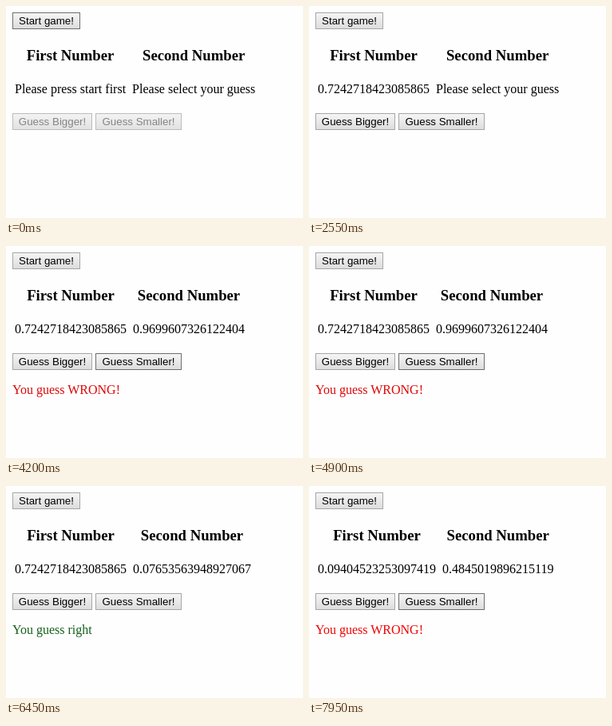
Animation of 372 by 265 pixels, one loop 8 s. Source, as an HTML page:

```html
<!DOCTYPE html>
<html lang="en">
<head>
<meta charset="utf-8">
<title>Number guessing game</title>
<style>
html, body { margin: 0; width: 100%; height: 100%; overflow: hidden; background: #fefefe; }
#stage { position: relative; width: 372px; height: 265px; overflow: hidden;
  font: 16px/18px "Liberation Serif", "Times New Roman", serif; color: #000; }
#stage > * { position: absolute; white-space: nowrap; }
.head { top: 51px; font-size: 18.72px; line-height: 21px; font-weight: bold; transform: translateX(-50%); }
.cell { top: 95px; }
.btn { box-sizing: border-box; height: 21px; padding: 2px 0; border: 1px solid #a6a6a6; text-align: center;
  font: 13.333px/15px "Liberation Sans", Arial, sans-serif;
  background: linear-gradient(#f5f5f5, #dddddd); }
.btn.hover { border-color: #6e6e6e; }
.btn.off { color: #848484; border-color: #bcbcbc; background: linear-gradient(#f3f3f3, #e2e2e2); }
#start { left: 8px; top: 8px; width: 85px; }
#bigger { left: 8px; top: 134px; width: 100px; }
#smaller { left: 112px; top: 134px; width: 108px; }
#msg { left: 8px; top: 171px; }
</style>
</head>
<body>
<div id="stage">
  <div class="btn" id="start">Start game!</div>
  <div class="head" id="head1">First Number</div>
  <div class="head" id="head2">Second Number</div>
  <div class="cell" id="first"></div>
  <div class="cell" id="second"></div>
  <div class="btn" id="bigger">Guess Bigger!</div>
  <div class="btn" id="smaller">Guess Smaller!</div>
  <div id="msg"></div>
</div>
<script>
const LOOP = 8000, LEFT = 11, GAP = 8;
const el = id => document.getElementById(id);
const ASK = "Please select your guess";
const WRONG = "You guess WRONG!", RIGHT = "You guess right";

// Each entry changes only the properties it names.
const events = [
  [0, { first: "Please press start first", second: ASK, msg: "", color: "#000", hover: "start", on: false }],
  [2150, { first: "0.7242718423085865", on: true }],
  [2450, { hover: "" }],
  [2750, { hover: "bigger" }],
  [2900, { second: "0.3604360085295315", msg: WRONG, color: "#dc0808" }],
  [3550, { hover: "" }],
  [3700, { hover: "smaller" }],
  [3900, { second: "0.9699607326122404" }],
  [5100, { second: "0.07653563948927067", msg: RIGHT, color: "#14601a" }],
  [5400, { hover: "bigger" }],
  [5900, { hover: "" }],
  [6500, { first: "0.09404523253097419", second: ASK, msg: "", hover: "start" }],
  [6800, { hover: "" }],
  [7000, { hover: "smaller" }],
  [7150, { second: "0.4845019896215119", msg: WRONG, color: "#f00404" }]
];

function stateAt(t) {
  const s = {};
  for (const [at, change] of events) if (at <= t) Object.assign(s, change);
  return s;
}

function placeColumn(cell, head, text, x) {
  cell.textContent = text;
  cell.style.left = x + "px";
  const w = cell.getBoundingClientRect().width;
  head.style.left = x + w / 2 + "px";
  return x + w + GAP;
}

function render(s) {
  const x2 = placeColumn(el("first"), el("head1"), s.first, LEFT);
  placeColumn(el("second"), el("head2"), s.second, x2);
  el("msg").textContent = s.msg;
  el("msg").style.color = s.color;
  for (const id of ["start", "bigger", "smaller"]) {
    el(id).classList.toggle("hover", s.hover === id);
    el(id).classList.toggle("off", id !== "start" && !s.on);
  }
}

let shown = "";
function tick() {
  const s = stateAt(performance.now() % LOOP);
  const key = JSON.stringify(s);
  if (key !== shown) {
    shown = key;
    render(s);
  }
  requestAnimationFrame(tick);
}
tick();
</script>
</body>
</html>
```
